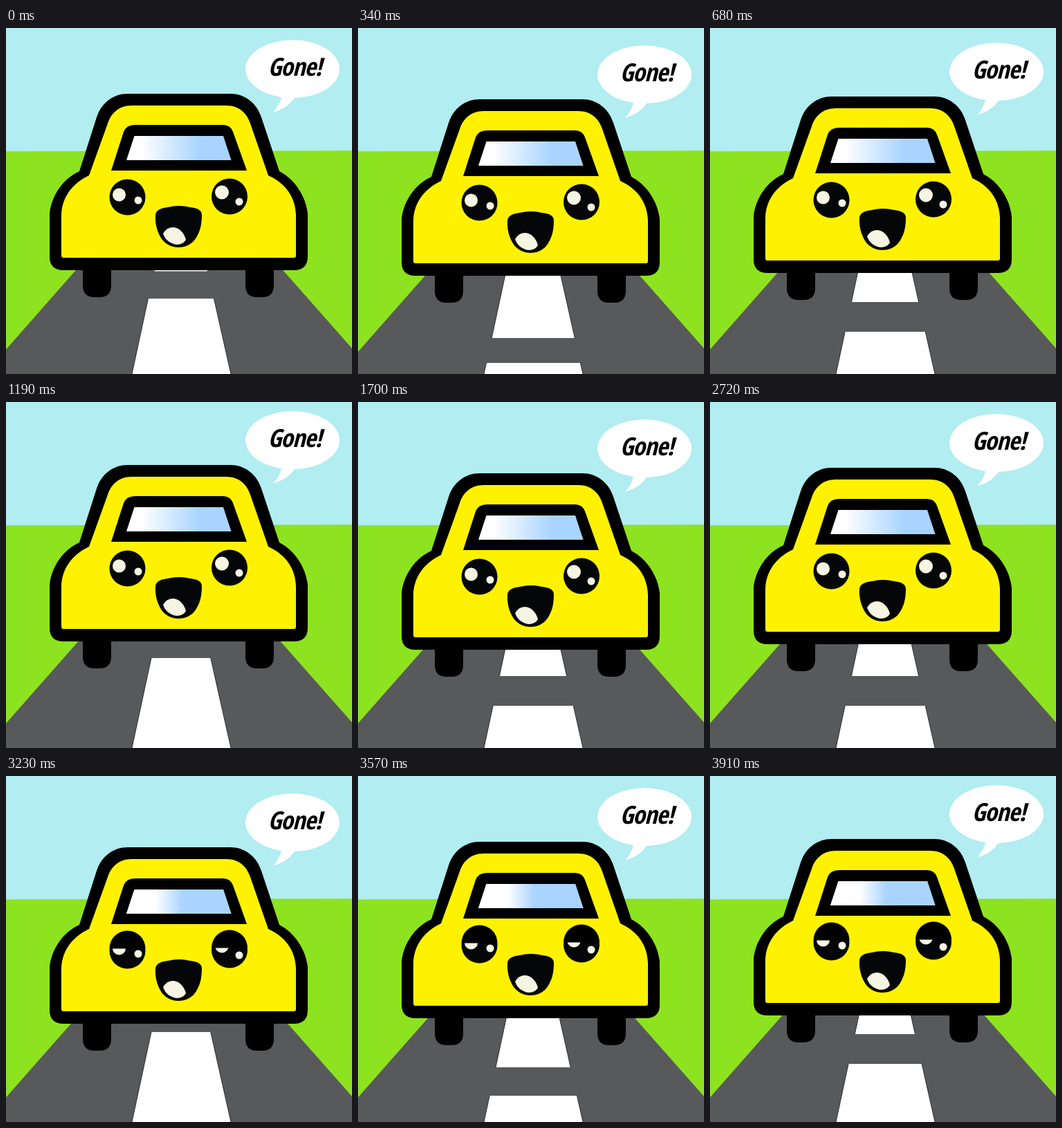
Animation of 500x500 px, one loop 4.08 s. Source, as an HTML page:

```html
<!DOCTYPE html>
<html lang="en">
<head>
<meta charset="utf-8">
<title>Happy car</title>
<style>
  html, body { margin: 0; width: 100%; height: 100%; overflow: hidden; }
  svg { display: block; width: 100vw; height: 100vh; }

  .bounce { animation: bounce 1360ms step-end infinite; }
  .gap { animation: gap 1020ms step-end infinite; }
  .far-gap { animation: far-gap 1020ms step-end infinite; }
  .verge { animation: verge 1020ms step-end infinite; }
  .sleepy { visibility: hidden; animation: sleepy 4080ms step-end infinite; }

  text {
    font: italic 700 36px "Open Sans Condensed", "Open Sans", "Noto Sans", sans-serif;
    font-stretch: 75%;
    letter-spacing: -1px;
  }

  @keyframes bounce {
    0%, 62.5% { transform: translateY(0); }
    12.5%, 50% { transform: translateY(4px); }
    25%, 37.5% { transform: translateY(8px); }
    75%, 87.5% { transform: translateY(-4px); }
    100% { transform: translateY(0); }
  }
  /* the gap between two lane dashes recedes towards the horizon */
  @keyframes gap {
    0%, 100% { y: 351.5px; height: 39.5px; }
    16.667% { y: 330px; height: 40px; }
    33.333% { y: 448px; height: 36px; }
    50% { y: 421px; height: 41px; }
    66.667% { y: 396px; height: 43px; }
    83.333% { y: 373px; height: 43px; }
  }
  @keyframes far-gap {
    0%, 50%, 100% { height: 0; }
    33.333% { height: 54px; }
  }
  @keyframes verge {
    0%, 50%, 100% { transform: translateX(0); }
    33.333% { transform: translateX(3px); }
  }
  @keyframes sleepy {
    0%, 100% { visibility: hidden; }
    79.1667% { visibility: visible; }
  }
</style>
</head>
<body>
<svg viewBox="0 0 500 500">
  <defs>
    <linearGradient id="glass" gradientUnits="userSpaceOnUse" x1="195" x2="280" y1="0" y2="0">
      <stop stop-color="#fff"/><stop offset="1" stop-color="#a9d4ff"/>
    </linearGradient>
    <linearGradient id="glass-sleepy" gradientUnits="userSpaceOnUse" x1="216" x2="255" y1="0" y2="0">
      <stop stop-color="#fff"/><stop offset="1" stop-color="#a9d4ff"/>
    </linearGradient>
    <path id="pane" d="M185.500 156H314L325.500 191H174Z"/>
    <path id="wheel" d="M0 335H41V372Q41 389 24 389H17Q0 389 0 372Z"/>
  </defs>

  <rect width="500" height="500" fill="#b1edf1"/>
  <path fill="#8de31f" d="M0 178.300L500 177.300V500H0Z"/>

  <g fill="#58595b">
    <path d="M130 300H356L500 463V500H0V450Z"/>
    <path class="verge" fill="#8de31f" d="M-10 300H145L0 464.500L-10 476Z"/>
    <path fill="#fff" d="M225 300H280L325 500H182Z"/>
    <path fill="none" stroke="#222" stroke-width=".9" d="M280 300L325 500M225 300L182 500"/>
    <rect class="gap" x="175" y="351.500" width="155" height="39.500"/>
    <rect class="far-gap" x="200" y="300" width="110" height="0"/>
  </g>

  <g class="bounce">
    <use href="#wheel" x="111"/>
    <use href="#wheel" x="346"/>
    <path d="M63 330V268C66 242 82 218 106 207L131 129C138 108 155 95 176 95H324C345 95 362 108 369 129L395 207C418 219 433 243 436 268V330Q436 350 416 350H83Q63 350 63 330Z"/>
    <path fill="#fff200" d="M80 329V270C81 243 97 224 120 213L147 138C152 123 163 112 182 112H318C337 112 348 123 353 138L379 213C403 224 418 243 419 270V329Q419 332 416 332H83Q80 332 80 329Z"/>

    <path d="M152 206L170 150Q174 140 186 140H314Q324 140 328 150L348 206Z"/>
    <use href="#pane" fill="url(#glass)"/>
    <use class="sleepy" href="#pane" fill="url(#glass-sleepy)"/>

    <g fill="#050608">
      <circle cx="175.500" cy="244.500" r="26"/>
      <circle cx="323" cy="243.500" r="26"/>
      <path d="M216 270C217 262 226 260 234 259Q250 255 266 259C276 260 283 263 283 270C283 285 280 297 272 307C266 314 257 317 249 317C240 317 231 313 225 305C218 295 215 281 216 270Z"/>
    </g>
    <g fill="#f6f5e3">
      <circle cx="163.500" cy="241" r="9.500"/>
      <circle cx="191" cy="249" r="5.500"/>
      <circle cx="312" cy="237.500" r="10"/>
      <circle cx="337" cy="251" r="5.500"/>
      <path d="M227 297Q232 288 242 288C252 289 258 298 260 306Q256 313 247 313C237 312 230 306 227 297Z"/>
    </g>
    <g class="sleepy">
      <path d="M149.500 241.500A26 26 0 0 1 201.500 241.500Z"/>
      <path d="M297 240.500A26 26 0 0 1 349 240.500Z"/>
    </g>

    <g fill="#fff">
      <ellipse cx="414" cy="59.300" rx="68" ry="42"/>
      <path d="M399 96Q396 112 386 121.500Q408 116 418 99Z"/>
    </g>
    <text x="417" y="69" text-anchor="middle">Gone!</text>
  </g>
</svg>
</body>
</html>
```
